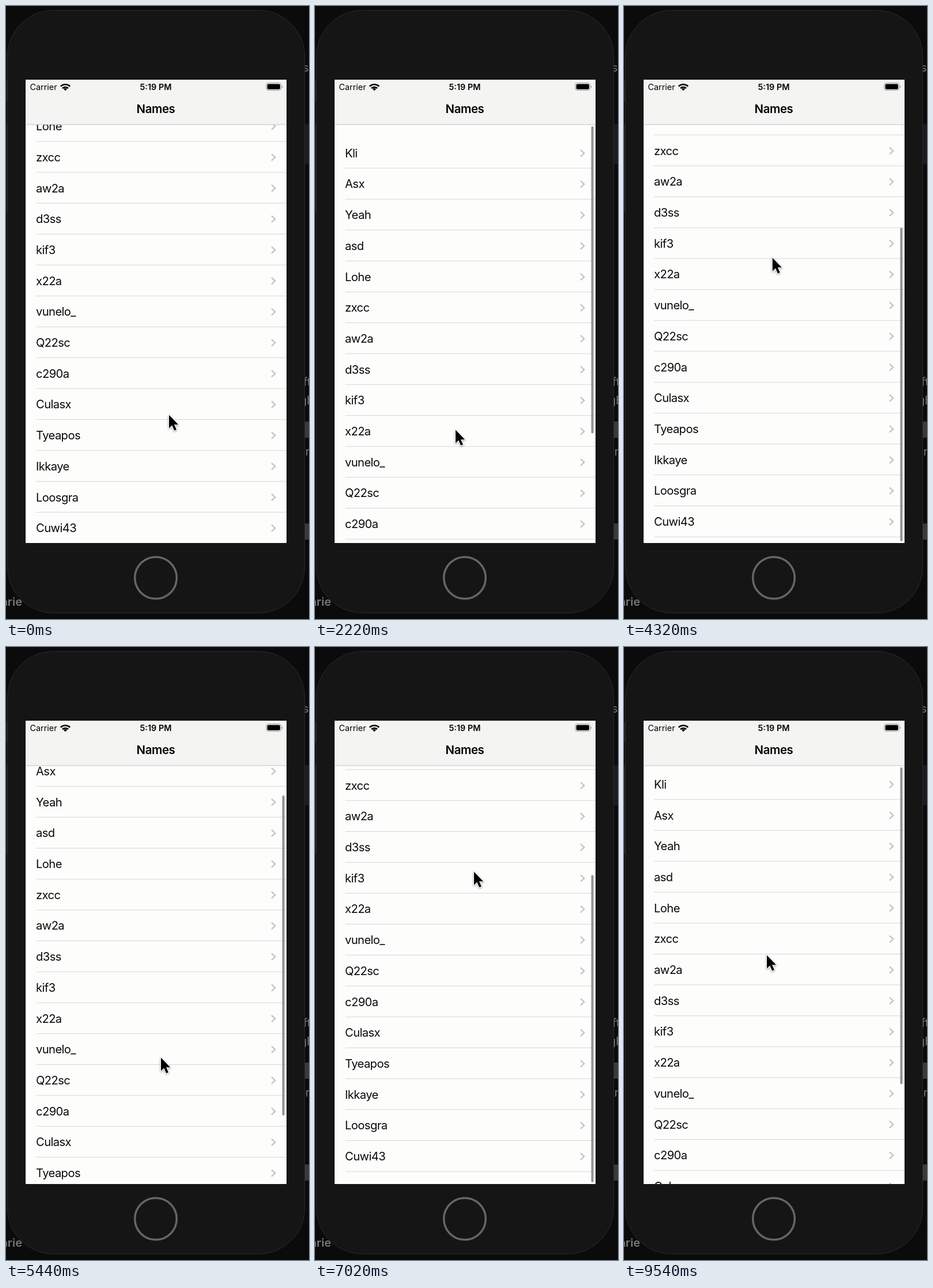
Recreate the animation shown at these times as an HTML page. Size 526 px wide and 1065 px high, loop 9560 ms.

```html
<!DOCTYPE html>
<html lang="en">
<meta charset="utf-8">
<title>Scrolling list</title>
<style>
  html, body { margin: 0; width: 100%; height: 100%; overflow: hidden; background: #0b0b0c; }
  svg { display: block; width: 526px; height: 1065px; font-family: Inter, sans-serif; }
  .row { font-size: 20.2px; letter-spacing: -.6px; fill: #0a0a0a; }
  .status { font-size: 14.4px; }
  .behind { font-size: 20px; fill: #777; }
  .bold { font-weight: 600; }
</style>
<svg viewBox="0 0 526 1065">
  <defs><clipPath id="view"><path d="M34 206H487V933H34z"/></clipPath></defs>

  <!-- windows behind the phone -->
  <path fill="#1c1c1e" d="M0 130h4v36H0zM0 205h4v154H0zM514 205h12v70h-12z"/>
  <path fill="#3a3a3b" d="M514 722h12v28h-12zM514 899h12v28h-12z"/>
  <g class="behind">
    <text x="515" y="114">s</text><text x="516" y="660">ft</text>
    <text x="510" y="692">gh</text><text x="515" y="781">ir</text>
    <text class="bold" x="28" y="1042" text-anchor="end">arie</text>
  </g>

  <!-- phone -->
  <rect x="2.500" y="7.500" width="516" height="1047" rx="80" fill="#151515" stroke="#2b2b2d"/>
  <circle cx="260" cy="993.500" r="36.300" fill="none" stroke="#666" stroke-width="3.500"/>
  <path fill="#fdfdfc" d="M34 128H487V933H34z"/>
  <g clip-path="url(#view)">
    <g id="list"></g>
    <rect id="bar" x="479.500" width="4" rx="2" fill="#929292"/>
  </g>

  <!-- header -->
  <path fill="#f4f4f2" d="M34 128H487V206H34z"/>
  <path fill="#c6c6d0" d="M34 205.500H487v1H34z"/>
  <text class="status" x="41.500" y="146">Carrier</text>
  <text class="status bold" x="260" y="146" text-anchor="middle">5:19 PM</text>
  <text class="bold" x="260" y="186.300" font-size="20.400" letter-spacing="-.4" text-anchor="middle">Names</text>
  <path d="M94.800 139.600a11.700 11.700 0 0 1 16.400 0M98 143a7.200 7.200 0 0 1 10 0" fill="none" stroke="#000" stroke-width="2.700"/>
  <path d="M103 147.300l-3-3a4.300 4.300 0 0 1 6 0z"/>
  <rect x="451.700" y="133.700" width="26" height="12.800" rx="3.500" fill="none" stroke="#999"/>
  <rect x="453.500" y="135.500" width="22.400" height="9.200" rx="2"/>
  <path fill="#999" d="M479 138a2.500 2.500 0 0 1 0 4.500z"/>

  <path id="cursor" d="M0 1.500V24.500L5.200 19.600 9.200 28.600 13 27 9 18.200H16.200z" stroke="#fff" stroke-width="2.400" paint-order="stroke" stroke-linejoin="round" style="filter: drop-shadow(0 1px 1.500px #0006)"/>
</svg>
<script>
const LOOP = 9560, PITCH = 53.7, TOP = 233, BOTTOM = -6, RANGE = TOP - BOTTOM;
const names = 'Kli Asx Yeah asd Lohe zxcc aw2a d3ss kif3 x22a vunelo_ Q22sc c290a Culasx Tyeapos Ikkaye Loosgra Cuwi43'.split(' ');
const swipes = [1100, 2816, 4931, 6014, 7878]; // start times, to the top and back in turn
const pointer = [[0, 283, 709], [1100, 260, 430], [2220, 244, 735], [3340, 248, 427], [4900, 262, 440],
  [5440, 269, 712], [7020, 276, 389], [8380, 256, 827], [9540, 248, 534]]; // [time, x, y]

const $ = id => document.getElementById(id);
const clamp = v => Math.min(1, Math.max(0, v));
const move = (id, x, y) => $(id).setAttribute('transform', `translate(${x} ${y})`);

$('list').innerHTML = names.map((name, i) => `<g transform="translate(0 ${i * PITCH})">
  <text class="row" x="52" y="7.300">${name}</text>
  <path d="M461 -5.500L467.300 .3 461 6.100" fill="none" stroke="#c4c4c8" stroke-width="2.300"/>
  <path d="M52.500 25.900H487v1H52.500z" fill="#d6d6dc"/></g>`).join('');

// Damped spring from 0 to 1 that first peaks, slightly past 1, after 1120 ms
function spring(ms) {
  const a = Math.max(0, ms) * Math.PI / 1120, damp = .753;
  return 1 - Math.exp(-damp * a) * (Math.cos(a) + damp * Math.sin(a));
}

function pointerAt(t) {
  const i = Math.max(1, pointer.findIndex(p => p[0] > t));
  const [from, to] = t < 9540 ? [pointer[i - 1], pointer[i]] : [pointer.at(-1), pointer.at(-1)];
  const u = clamp((t - from[0]) / (to[0] - from[0] || 1)), e = (1 - Math.cos(Math.PI * u)) / 2;
  return [1, 2].map(k => from[k] + (to[k] - from[k]) * e);
}

function draw(now) {
  const t = now % LOOP;
  const y = swipes.reduce((sum, start, i) => sum + (i % 2 ? -RANGE : RANGE) * spring(t - start), BOTTOM);
  move('list', 0, y);
  move('cursor', ...pointerAt(t));

  // The bar shrinks against the end while the list is pulled past it
  const height = 556 - Math.max(0, y - TOP, BOTTOM - y);
  $('bar').setAttribute('y', 209 + (721 - height) * clamp((TOP - y) / RANGE));
  $('bar').setAttribute('height', height);
  $('bar').setAttribute('opacity', clamp((t - swipes[0]) / 100));
  requestAnimationFrame(draw);
}
requestAnimationFrame(draw);
</script>
</html>
```
